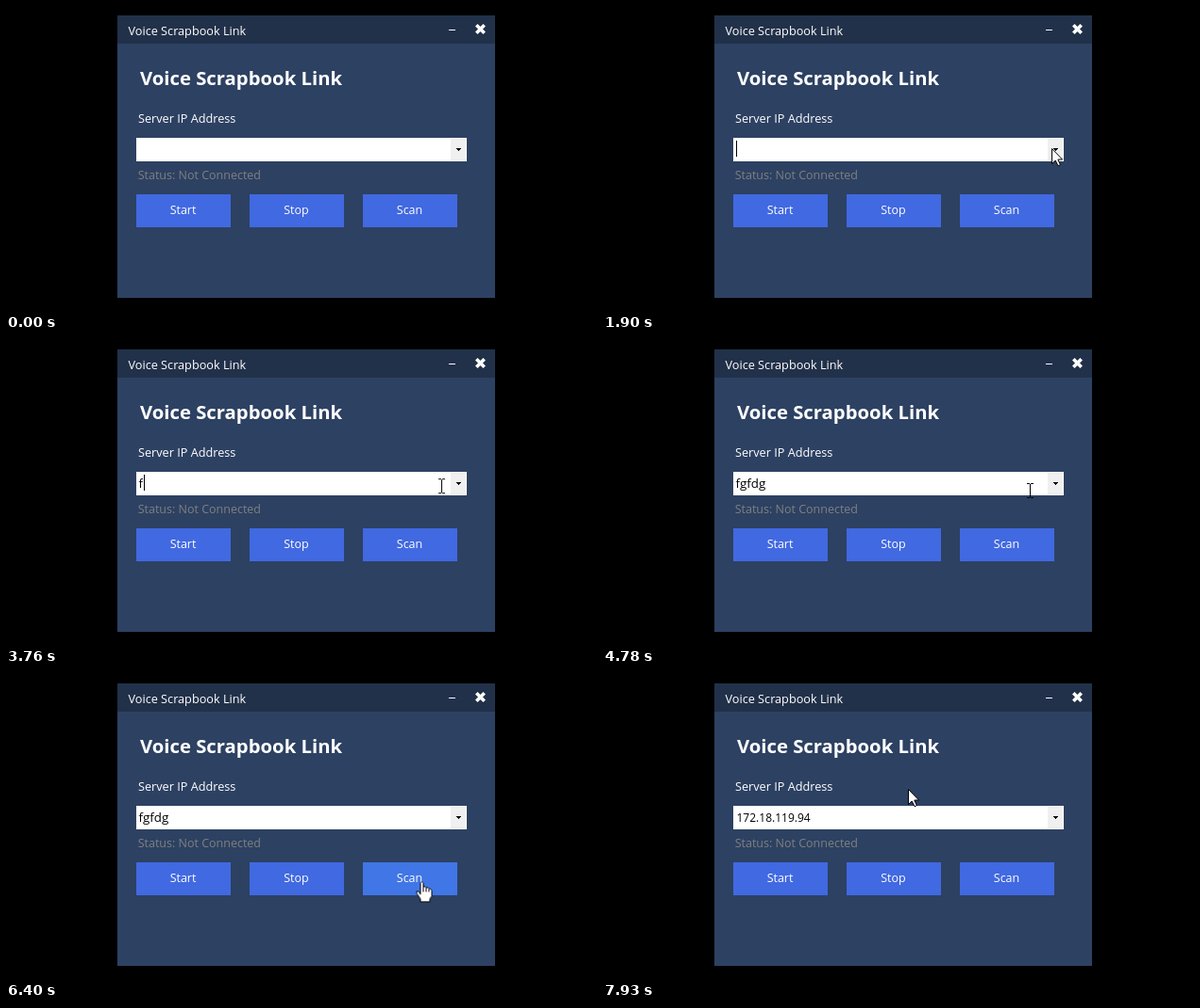
These frames come from a looping animation (626x325 px, 8000 ms). An HTML page:

```html
<!DOCTYPE html>
<html lang="en">
<head>
<meta charset="utf-8">
<title>Voice Scrapbook Link</title>
<style>
  html, body { margin: 0; width: 100%; height: 100%; overflow: hidden; background: #000; }
  svg { display: block; width: 626px; height: 325px; }
  text { font: 12.5px "Open Sans", "Noto Sans", sans-serif; fill: #fff; }
  .bar-title, .label { font-size: 12.7px; }
  .heading { font-size: 20.3px; font-weight: 700; }
  .status { fill: #808080; }
  .button rect { fill: #4169e1; }
  .button text { text-anchor: middle; }
  .field text { fill: #000; }
  .field .typed { font-size: 13.3px; }
  .field .found { font-size: 12px; }

  /* Everything shares one 8 s clock; 1% is 80 ms. */
  .cursor { animation: move 8s linear infinite; }
  .step { animation: 8s step-end infinite; }
  .arrow { animation-name: arrow; }
  .beam { animation-name: beam; }
  .hand { animation-name: hand; }
  .scan rect { animation: scan 8s step-end infinite; }
  .list { animation-name: list; }
  .entry { animation-name: entry; }
  .found { animation-name: found; }
  .typing { animation-name: typing; }
  .caret { animation-name: blink; }

  @keyframes move {
    0%, 2.625% { transform: translate(541px, 298px); animation-timing-function: ease-out; }
    12.5%, 12.75% { transform: translate(467px, 177px); }
    17.5%, 22.125% { transform: translate(469px, 152px); }
    23.75% { transform: translate(475px, 151px); }
    26.625%, 31.5% { transform: translate(486px, 154px); }
    33.25%, 43.75% { transform: translate(478px, 150px); }
    48.75%, 54% { transform: translate(452px, 158px); }
    55.25%, 63% { transform: translate(452px, 160px); }
    63.75%, 66.375% { transform: translate(450px, 176px); }
    73.75%, 79.5% { transform: translate(444px, 226px); }
    86.5%, 89.5% { transform: translate(396px, 150px); }
    99.125%, 100% { transform: translate(323px, 122px); }
  }
  @keyframes arrow {
    0%, 15%, 45.1%, 69.9% { opacity: 0; }
    2.625%, 22.7%, 63.25%, 92.9%, 100% { opacity: 1; }
  }
  @keyframes beam {
    0%, 22.7%, 63.25%, 92.9%, 100% { opacity: 0; }
    15%, 45.1%, 89.5% { opacity: 1; }
  }
  @keyframes hand {
    0%, 89.5%, 100% { opacity: 0; }
    69.9% { opacity: 1; }
  }
  @keyframes scan {
    0%, 89.5%, 100% { fill: #4169e1; }
    69.9%, 76.5% { fill: #4176e6; }
    75.25% { fill: #3c64d6; }
  }
  @keyframes list {
    0%, 41.75%, 100% { opacity: 0; }
    35% { opacity: 1; }
  }
  @keyframes entry {
    0% { opacity: 1; }
    89.5%, 100% { opacity: 0; }
  }
  @keyframes found {
    0% { opacity: 0; }
    89.5%, 100% { opacity: 1; }
  }
  @keyframes typing {
    0% { transform: translateX(0); }
    46.25% { transform: translateX(5px); }
    48% { transform: translateX(12px); }
    49.5% { transform: translateX(17px); }
    51.25% { transform: translateX(25px); }
    53.125%, 100% { transform: translateX(32px); }
  }
  @keyframes blink {
    0%, 29.75%, 43%, 59.75%, 73%, 100% { opacity: 0; }
    20.375%, 36.375%, 46.25%, 66.375% { opacity: 1; }
  }
</style>
</head>
<body>
<svg viewBox="0 0 626 325">
  <rect width="626" height="325"/>
  <rect x="118" y="10" width="400" height="300" fill="#2d4162"/>
  <rect x="118" y="10" width="400" height="30" fill="#22314a"/>
  <text class="bar-title" x="129.5" y="31">Voice Scrapbook Link</text>
  <path d="M469 25.5h7" stroke="#fff"/>
  <path d="M498.3 20.3l8.4 8.4m0-8.4l-8.4 8.4" stroke="#fff" stroke-width="3.6"/>

  <text class="heading" x="142" y="84">Voice Scrapbook Link</text>
  <text class="label" x="140" y="124">Server IP Address</text>
  <text class="status" x="139.7" y="184">Status: Not Connected</text>

  <g class="field">
    <rect x="138" y="140" width="350" height="25" fill="#fff"/>
    <g class="entry step">
      <text class="typed" x="140.5" y="157">fgfdg</text>
      <g class="typing step">
        <rect x="140" y="142" width="60" height="21" fill="#fff"/>
        <rect class="caret step" x="141" y="143" width="1" height="17"/>
      </g>
    </g>
    <text class="found step" x="141.5" y="157">172.18.119.94</text>
    <rect x="471" y="141" width="16" height="23" fill="#f0f0f0"/>
    <path d="M477 151h5v1h-1v1h-1v1h-1v-1h-1v-1h-1z"/>
  </g>

  <g class="button">
    <rect x="138" y="200" width="100" height="35"/>
    <text x="187.5" y="221">Start</text>
  </g>
  <g class="button">
    <rect x="258" y="200" width="100" height="35"/>
    <text x="307.5" y="221">Stop</text>
  </g>
  <g class="button scan">
    <rect x="378" y="200" width="100" height="35"/>
    <text x="427.5" y="221">Scan</text>
  </g>

  <rect class="list step" x="138.5" y="165.5" width="349" height="18" fill="#fff" stroke="#555"/>

  <g class="cursor">
    <path class="arrow step" d="M.5 .5V16.5L4.2 13L7 18.7L9.4 17.6L6.8 12H11.6Z" fill="#fff" stroke="#000"/>
    <path class="beam step" d="M-3 -7.5h3m1 0h3M.5 -7v14M-3 7.5h3m1 0h3" fill="none" stroke="#000"/>
    <path class="hand step" d="M-1.5 13.5V1.5L-.5 .5H.5L1.5 1.5V5.5H3.5L4.5 6.5H6.5L7.5 7.5H8.5L10.5 9.5V15.5L8.5 18.5V21.5H-1.5V18.5L-5.5 12.5V10.5H-3.5ZM1.5 5.5V11M4.5 6.5V11M7.5 7.5V11" fill="#fff" stroke="#000"/>
  </g>
</svg>
</body>
</html>
```
